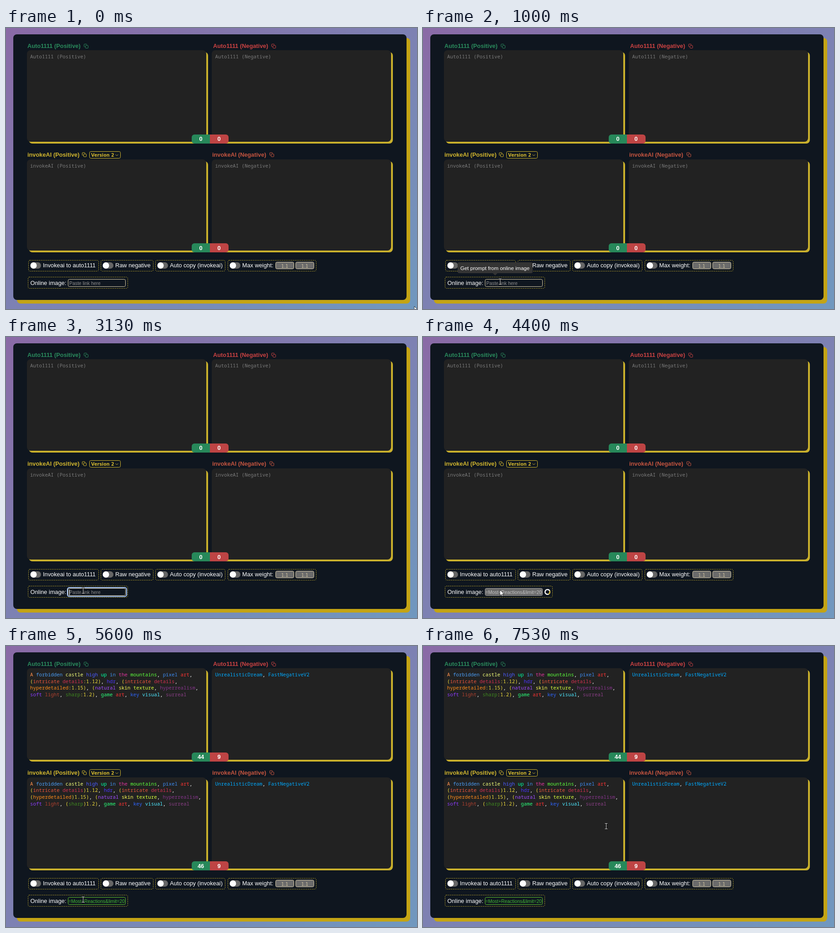
An HTML page for the animation above (8000 ms loop, 903 by 620 pixels).

```html
<!DOCTYPE html>
<html lang="en">
<head>
<meta charset="utf-8">
<title>Prompt converter</title>
<style>
  html, body { margin: 0; width: 100%; height: 100%; overflow: hidden; }
  svg { display: block; }
  text { font: 12.8px "Liberation Sans", Arial, sans-serif; fill: #fff; white-space: pre; }
  .bold { font-weight: bold; }
  .mono { font: 10.8px "Noto Sans Mono", monospace; }
  .hint { fill: #7b7b7b; }
  .small { font-size: 10.4px; }
  .tip { font-size: 11.5px; }
  .wide { font: 9.6px "DejaVu Sans", sans-serif; }
  .wide.bold { font-weight: bold; }
  .line { fill: none; stroke-width: 1; }
  .dashed { fill: none; stroke: #c9b02c; stroke-dasharray: 2 2; }
</style>
</head>
<body>
<svg id="stage" width="903" height="620" viewBox="0 0 903 620"></svg>
<script>
const LOOP = 8000;
const PANEL = '#0f161f', GOLD = '#c9b02c', GREEN = '#27885a', RED = '#be4444', TAN = '#d8cba8';

const rect = (x, y, w, h, r, fill, extra = '') =>
  `<rect x="${x}" y="${y}" width="${w}" height="${h}" rx="${r}" fill="${fill}" ${extra}/>`;
const text = (x, y, str, cls = '', extra = '') =>
  `<text x="${x}" y="${y}" class="${cls}" ${extra}>${str}</text>`;
const paint = color => `style="fill:${color}"`;

const heading = (x, y, str, color, iconX) =>
  text(x, y, str, 'bold', paint(color)) +
  `<g class="line" stroke="${color}" transform="translate(${iconX} ${y - 9})">
    <path d="M2.5 6.5H1.5Q.5 6.5 .5 5.5V1.5Q.5 .5 1.5 .5H5.5Q6.5 .5 6.5 1.5V2.5"/>
    <rect x="3.5" y="3.5" width="6" height="6" rx="1"/></g>`;

const area = (x, y, h) =>
  rect(x + 4, y + 4, 394, h, 8, GOLD) + rect(x, y, 394, h, 8, '#222');

const counter = y =>
  `<path d="M448 ${y}H414a6 6 0 0 0-6 6v8a6 6 0 0 0 6 6h34z" fill="${GREEN}"/>
   <path d="M448 ${y}h35a6 6 0 0 1 6 6v8a6 6 0 0 1-6 6h-35z" fill="${RED}"/>`;

const counts = (y, pos, neg) =>
  text(428, y, pos, 'bold', 'text-anchor="middle"') + text(468, y, neg, 'bold', 'text-anchor="middle"');

const toggle = (x, w, label) =>
  `<rect class="dashed" x="${x + .5}" y="512.5" width="${w}" height="24" rx="3"/>` +
  rect(x + 5, 517, 23, 14, 7, '#666') +
  `<circle cx="${x + 11.5}" cy="524" r="7" fill="#fff"/>` + text(x + 32, 528, label);

const weight = x =>
  rect(x + .5, 516.5, 40, 15, 3, '#6b6b6b', `stroke="${TAN}"`) +
  text(x + 20.5, 528.5, '1.1', 'wide', 'text-anchor="middle" ' + paint('#d0c4a2'));

const wordColors = {
  A: '#ff914d', forbidden: '#4a9df5', castle: '#f3ff7a', high: '#4a5bff', up: '#00ffa0', in: '#3f8fe8',
  the: '#e0359f', mountains: '#5cff3c', pixel: '#3d8bf0', art: '#ff3333', intricate: '#e8553c',
  details: '#d0304f', hdr: '#4b35ff', hyperdetailed: '#ff8c1a', natural: '#a04cff', skin: '#ffff55',
  texture: '#d8ff3c', hyperrealism: '#85358a', soft: '#8d3cff', light: '#b0412f', sharp: '#3f8a1f',
  game: '#2bff7a', key: '#2f66ff', visual: '#4de8ff', surreal: '#8a3f86',
  UnrealisticDream: '#0af', FastNegativeV2: '#0af', ',': '#fff'
};
const prompt = (x, y, lines) => lines.map((line, i) => {
  const spans = line.match(/[a-z]\w*|,|[^a-z,]+/gi)
    .map(word => `<tspan style="fill:${wordColors[word] || '#f0dc3c'}">${word}</tspan>`).join('');
  return text(x, y + i * 14.67, spans, 'mono');
}).join('');

const firstLine = 'A forbidden castle high up in the mountains, pixel art,';
const negative = ['UnrealisticDream, FastNegativeV2'];

stage.innerHTML = `
  <linearGradient id="sky" x2="1" y2="1">
    <stop stop-color="#8a6aa6"/><stop offset="1" stop-color="#7098bf"/>
  </linearGradient>
  ${rect(0, 0, 903, 620, 0, 'url(#sky)')}
  ${rect(24, 22, 864, 586, 8, '#c4a414')}
  ${rect(16, 14, 864, 586, 8, PANEL)}
  ${heading(47, 44, 'Auto1111 (Positive)', '#2a8a5c', 171)}
  ${heading(455, 44, 'Auto1111 (Negative)', '#c94242', 583)}
  ${heading(47, 283.5, 'invokeAI (Positive)', '#d0b52e', 167)}
  ${heading(453, 283.5, 'invokeAI (Negative)', '#c4543f', 579)}
  ${rect(183.5, 272.5, 68, 15, 3, 'none', 'stroke="#d0b52e"')}
  ${text(187, 284, 'Version 2', 'wide bold', paint('#d0b52e'))}
  <path class="line" d="M240.5 279l3 3 3-3" stroke="#d0b52e"/>
  ${area(46, 49, 202)}${area(452, 49, 202)}${area(46, 290, 201)}${area(452, 290, 201)}
  ${counter(235)}${counter(475)}
  <g id="empty">
    ${text(53, 67, 'Auto1111 (Positive)', 'mono hint')}
    ${text(459.5, 67, 'Auto1111 (Negative)', 'mono hint')}
    ${text(53, 307.5, 'invokeAI (Positive)', 'mono hint')}
    ${text(459.5, 307.5, 'invokeAI (Negative)', 'mono hint')}
    ${counts(249, 0, 0)}${counts(489.5, 0, 0)}
  </g>
  <g id="filled">
    ${prompt(53, 67, [firstLine,
      '(intricate details:1.12), hdr, (intricate details,',
      'hyperdetailed:1.15), (natural skin texture, hyperrealism,',
      'soft light, sharp:1.2), game art, key visual, surreal'])}
    ${prompt(53, 307.5, [firstLine,
      '(intricate details)1.12, hdr, (intricate details,',
      '(hyperdetailed)1.15), (natural skin texture, hyperrealism,',
      'soft light, (sharp)1.2), game art, key visual, surreal'])}
    ${prompt(459.5, 67, negative)}${prompt(459.5, 307.5, negative)}
    ${counts(249, 44, 9)}${counts(489.5, 46, 9)}
  </g>
  ${toggle(49, 154, 'Invokeai to auto1111')}
  ${toggle(208, 115, 'Raw negative')}
  ${toggle(328, 153, 'Auto copy (invokeai)')}
  ${toggle(487, 194, 'Max weight:')}
  ${weight(592)}${weight(636)}
  <rect id="frame" class="dashed" x="48.5" y="549.5" height="25" rx="3"/>
  ${text(53.5, 567, 'Online image:')}
  <rect id="ring" x="135" y="553" width="130" height="19.5" rx="4" fill="none" stroke="#a4c4f7" stroke-width="2"/>
  <rect id="field" x="136.5" y="554.5" width="126" height="16" rx="3"/>
  ${text(139, 566.5, 'Paste link here', 'small', 'id="hint" ' + paint('#8d8d8d'))}
  <svg x="138" y="555" width="124" height="15">
    ${text(123, 11.5, '=Most+Reactions&amp;limit=20', 'small', 'id="link" text-anchor="end"')}
  </svg>
  <path id="caret" d="M139.5 557v13" stroke="#fff"/>
  <g id="spinner" fill="none" stroke-width="2.5">
    <circle r="5.3" stroke="#fff"/><path d="M3.75 -3.75A5.3 5.3 0 0 1 3.75 3.75" stroke="${GOLD}"/>
  </g>
  <g id="tooltip">
    ${rect(76, 517, 165, 24, 4, '#343434')}
    <path d="M153.500 541h10l-5 5z" fill="#343434"/>
    ${text(82, 533.5, 'Get prompt from online image', 'tip')}
  </g>
  <path id="arrow" d="M0 0V12.500L3 9.800 5 14 7 13.200 5.100 9H9Z" fill="#fff" stroke="#000" stroke-width=".7"/>
  <g id="beam" fill="none">
    <path d="M-3 -6H3M0 -6V6M-3 6H3" stroke="#000" stroke-width="2"/>
    <path d="M-3 -6H3M0 -6V6M-3 6H3" stroke="#ddd"/>
  </g>`;

const el = id => document.getElementById(id);
const show = (id, on) => el(id).setAttribute('visibility', on ? 'visible' : 'hidden');
const smooth = (t, a, b) => {
  const p = Math.min(1, Math.max(0, (t - a) / (b - a)));
  return p * p * (3 - 2 * p);
};

// Pointer stops: time, x, y
const stops = [[0, 897, 614], [70, 897, 614], [730, 169, 575], [930, 169, 560],
  [6700, 169, 560], [7070, 17, 478], [7530, 402, 398], [LOOP, 402, 398]];
function pointerAt(t) {
  const i = stops.findIndex(s => s[0] > t);
  const [a, b] = [stops[i - 1], stops[i]];
  const p = smooth(t, a[0], b[0]);
  return [1, 2].map(k => a[k] + (b[k] - a[k]) * p);
}

function render(t) {
  const focused = t >= 2070 && t < 3670;
  const busy = t >= 3670 && t < 5600;
  const done = t >= 5600;
  const filled = t >= 5200;
  show('empty', !filled);
  show('filled', filled);
  show('ring', focused);
  show('caret', focused && Math.floor((t - 2070) / 530) % 2 === 0);
  show('hint', t < 3670);
  show('link', t >= 3670);
  show('spinner', busy);
  el('spinner').setAttribute('transform', `translate(273.5 562.5) rotate(${(t - 4400) * .36 + 20})`);
  el('frame').setAttribute('width', busy ? 236 : 219);
  el('field').setAttribute('fill', busy ? '#6b6b6b' : PANEL);
  el('field').setAttribute('stroke', done ? '#62c52f' : busy ? '#9b9b9b' : TAN);
  el('link').style.fill = done ? '#43b836' : '#c4c4c4';
  el('tooltip').setAttribute('opacity', smooth(t, 560, 980) * (1 - smooth(t, 2080, 2330)));

  const [x, y] = pointerAt(t);
  const overInput = x > 137 && x < 263 && y > 554 && y < 571 && !busy;
  const overArea = x > 46 && x < 440 && y > 290 && y < 491;
  const beam = overInput || overArea;
  show('beam', beam);
  show('arrow', !beam);
  el('beam').setAttribute('transform', `translate(${Math.round(x) + .5} ${Math.round(y) - .5})`);
  el('arrow').setAttribute('transform', `translate(${x} ${busy ? y - 2 : y})`);
}

function tick() {
  render(performance.now() % LOOP);
  requestAnimationFrame(tick);
}
tick();
</script>
</body>
</html>
```
